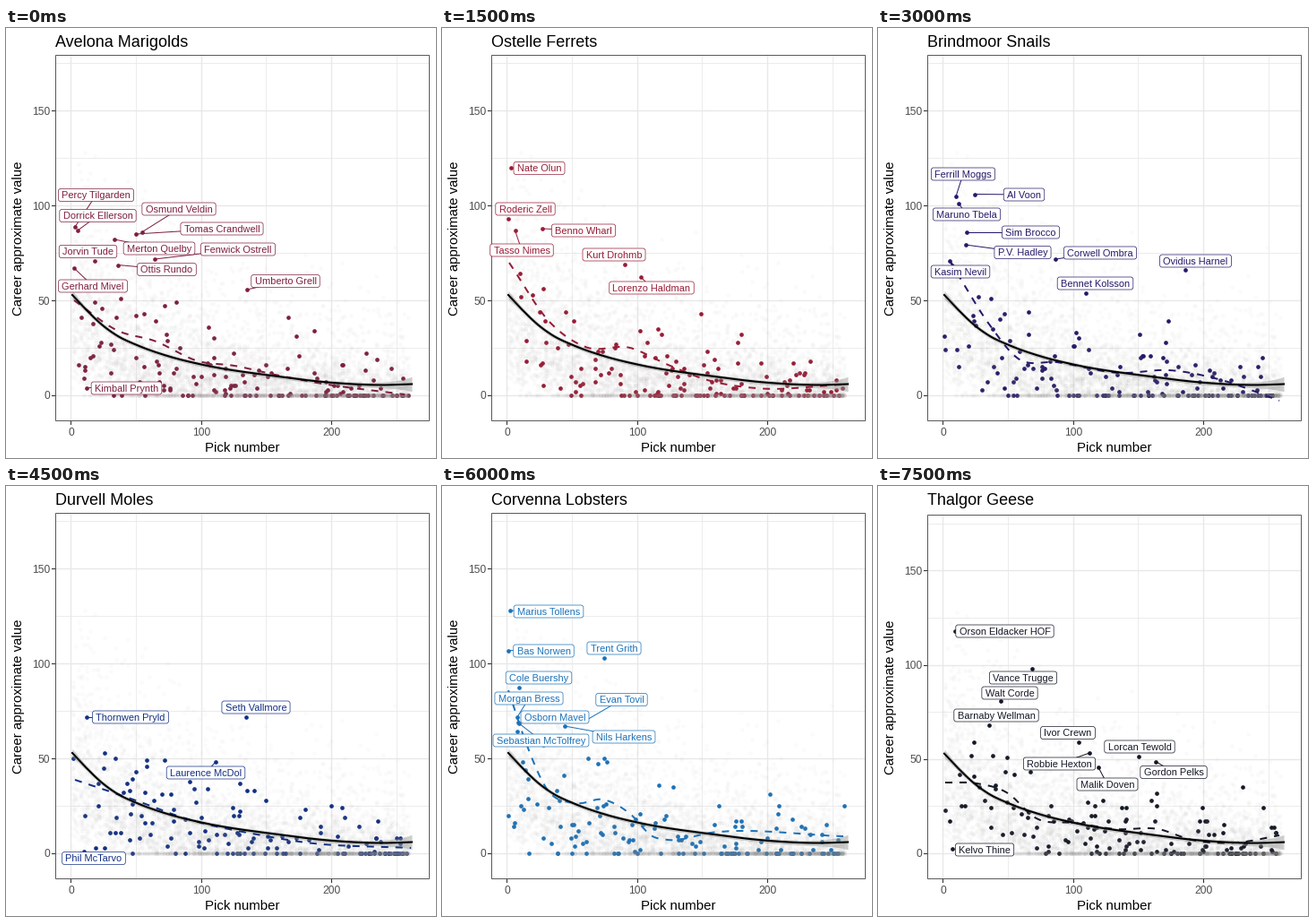
A matplotlib script that plays this animation: 480x480 px, repeating every 8000 ms.

```python
import numpy as np
import matplotlib.pyplot as plt
from matplotlib.animation import FuncAnimation
from matplotlib.patches import FancyBboxPatch, Rectangle

PX = 0.72  # points per pixel at 100 dpi
X0, XSTEP = 72.4, 1.4535
Y0, YSTEP = 410, 2.118
LEFT, RIGHT, TOP, BOTTOM = 55, 472, 30, 438

plt.rcParams["font.family"] = "Liberation Sans"
fig = plt.figure(figsize=(4.8, 4.8), dpi=100, facecolor="white")
ax = fig.add_axes([0, 0, 1, 1])
ax.set_xlim(0, 480)
ax.set_ylim(480, 0)
ax.axis("off")


def smooth(points, n=220):
    """Cubic Hermite curve through a few (x, y) points."""
    x, y = np.array(points, float).T
    slope = np.gradient(y, x)
    xs = np.linspace(x[0], x[-1], n)
    i = np.clip(np.searchsorted(x, xs) - 1, 0, len(x) - 2)
    h = x[i + 1] - x[i]
    t = (xs - x[i]) / h
    ys = ((2 * t**3 - 3 * t**2 + 1) * y[i] + (t**3 - 2 * t**2 + t) * h * slope[i]
          + (3 * t**2 - 2 * t**3) * y[i + 1] + (t**3 - t**2) * h * slope[i + 1])
    return xs, ys


def draft(seed, n, cap):
    """Random picks whose value decays with pick number; late ones often fail."""
    rng = np.random.default_rng(seed)
    pick = rng.integers(1, 260, n)
    fail = 0.55 * (pick / 255) ** 1.1
    mean = (5 + 47 * np.exp(-pick / 62)) / (1 - fail)
    shape = 1.1 + 1.4 * np.exp(-pick / 50)
    value = np.round(rng.gamma(shape, mean / shape))
    value[rng.random(n) < fail] = 0
    keep = value < cap * (0.55 + 0.45 * np.exp(-pick / 90))
    return pick[keep], value[keep]


LEAGUE = draft(12, 5200, 138)
TREND = smooth([(74, 298), (90, 315), (108, 332), (125, 344), (145, 353.5),
                (180, 366), (220, 376), (300, 388.5), (365, 396), (420, 398.5),
                (453, 397.5)])
scenes = []


class Scene:
    def __init__(self, title, color, tint, squeeze=1.0):
        self.color, self.tint, self.k = color, tint, squeeze
        self.items = []
        self.axes_frame()
        self.text(55, 21, title, 18)
        scenes.append(self)
        self.dots(draft(len(scenes), 150, 68), color, 2)
        self.dots(LEAGUE, tint, 3, alpha=0.036)

    def fit(self, y):
        return Y0 + (np.asarray(y) - Y0) * self.k

    def value_y(self, v):
        return self.fit(Y0 - YSTEP * np.asarray(v))

    def line(self, x, y, color, width, z, **kw):
        self.items += ax.plot(x, y, color=color, lw=width * PX, zorder=z, **kw)

    def text(self, x, y, s, size, color="black", ha="left", z=9, **kw):
        t = ax.text(x, y, s, fontsize=size * PX, color=color, ha=ha,
                    va="baseline", zorder=z, **kw)
        self.items.append(t)
        return t

    def markers(self, x, y, color, z, **kw):
        self.items += ax.plot(x, y, "o", ms=4.7 * PX, mew=0, color=color,
                              zorder=z, **kw)

    def dots(self, players, color, z, **kw):
        pick, value = players
        self.markers(X0 + XSTEP * pick, self.value_y(value), color, z, **kw)

    def axes_frame(self):
        top = self.fit(TOP)
        for v in range(0, 176, 25):
            y = self.value_y(v)
            major = v % 50 == 0
            self.line([LEFT, RIGHT], [y, y], "#e8e8e8", 1.4 if major else 0.8, 1)
            if major:
                self.line([LEFT - 4, LEFT], [y, y], "#333333", 1.1, 1)
                self.text(49, y + 4.5, str(v), 12, "#4d4d4d", "right")
        for p in range(0, 251, 50):
            x = X0 + XSTEP * p
            major = p % 100 == 0
            self.line([x, x], [top, BOTTOM], "#e8e8e8", 1.4 if major else 0.8, 1)
            if major:
                self.line([x, x], [BOTTOM, BOTTOM + 4], "#333333", 1.1, 1)
                self.text(x, 455, str(p), 12, "#4d4d4d", "center")
        box = Rectangle((LEFT, top), RIGHT - LEFT, BOTTOM - top, fill=False,
                        ec="#5a5a5a", lw=1 * PX, zorder=6)
        self.items.append(ax.add_patch(box))
        self.text(263.7, 473, "Pick number", 15, ha="center")
        self.text(18, (top + BOTTOM) / 2 + 0.5, "Career approximate value", 15,
                  ha="center", rotation=90, rotation_mode="anchor")

    def curves(self, *points):
        x, y = TREND[0], self.fit(TREND[1])
        half = 2.3 + 2.5 * np.exp((74 - x) / 12) + 6 * np.exp((x - 453) / 18)
        self.items.append(ax.fill_between(x, y - half, y + half, lw=0,
                                          color="#8f938f", alpha=0.45, zorder=4))
        self.line(*smooth(points), self.color, 2, 4.5, dashes=(4, 4),
                  dash_capstyle="butt")
        self.line(x, y, "black", 2.1, 5)

    def label(self, name, px, py, cx, cy):
        """Mark a player at (px, py) with a name box centred on (cx, cy)."""
        z = 7 + len(self.items) * 0.01
        t = self.text(cx, cy + 3.9, name, 11, self.color, "center", z + 0.005)
        w, h = t.get_window_extent().width + 7.5, 14
        gap = np.hypot(max(abs(px - cx) - w / 2, 0), max(abs(py - cy) - h / 2, 0))
        if gap > 4.5:
            self.line([px, cx], [py, cy], self.color, 1, 6.5)
        box = FancyBboxPatch((cx - w / 2, cy - h / 2), w, h, fc="white",
                             ec=self.color, lw=0.7 * PX, zorder=z,
                             boxstyle="round,pad=0,rounding_size=2.6")
        self.items.append(ax.add_patch(box))
        self.markers([px], [py], self.color, 2)


s = Scene("Avelona Marigolds", "#7d1f3d", "#988a8e")
s.label("Percy Tilgarden", 77, 222, 100.5, 186.5)
s.label("Dorrick Ellerson", 80, 226, 102.5, 209.5)
s.label("Osmund Veldin", 151.5, 228, 193, 202)
s.label("Tomas Crandwell", 145, 230, 241, 224)
s.label("Merton Quelby", 121, 236, 171, 246)
s.label("Fenwick Ostrell", 166, 258, 259, 247)
s.label("Jorvin Tude", 99, 260, 91.5, 249.5)
s.label("Ottis Rundo", 125, 264.5, 179.5, 269.5)
s.label("Umberto Grell", 269, 292, 312, 282.5)
s.label("Gerhard Mivel", 76, 268, 97, 288)
s.label("Kimball Prynth", 90, 401.5, 134.5, 402)
s.curves((76, 304), (125, 338), (165, 349), (215, 372), (255, 377), (300, 387),
         (350, 396.5), (445, 409))

s = Scene("Ostelle Ferrets", "#971c35", "#968a8d")
s.label("Nate Olun", 77, 156, 108.5, 156.5)
s.label("Roderic Zell", 74, 213, 93, 202)
s.label("Benno Wharl", 112, 224, 158, 226)
s.label("Tasso Nimes", 81.5, 226, 89, 248)
s.label("Kurt Drohmb", 203.5, 264, 192, 253)
s.label("Lorenzo Haldman", 222, 278, 234, 290)
s.curves((75, 262), (120, 328), (160, 356), (210, 357), (250, 375), (300, 394),
         (350, 402), (448, 398))

s = Scene("Brindmoor Snails", "#241a68", "#8e908a")
s.label("Ferrill Moggs", 87, 188, 95, 163)
s.label("Al Voon", 108, 185.5, 163, 186)
s.label("Maruno Tbela", 90, 196, 99, 208)
s.label("Sim Brocco", 99, 228, 170.5, 228)
s.label("P.V. Hadley", 97.5, 242, 161.5, 250.5)
s.label("Corwell Ombra", 198, 258, 248, 251)
s.label("Ovidius Harnel", 343, 270, 354.5, 260)
s.label("Bennet Kolsson", 231.5, 296, 242.5, 285)
s.label("Kasim Nevil", 80, 260, 92, 272)
s.curves((80, 260), (125, 332), (155, 368), (200, 373), (270, 385), (325, 382),
         (380, 392), (448, 416))

s = Scene("Durvell Moles", "#122f83", "#8f8f8f")
s.label("Thornwen Pryld", 90, 258, 139, 258)
s.label("Seth Vallmore", 267.5, 258, 279, 247)
s.label("Laurence McDol", 234, 308, 223, 320)
s.label("Phil McTarvo", 110, 404, 98, 415.5)
s.curves((77, 328), (145, 351), (200, 371), (280, 389), (335, 398), (452, 404))

s = Scene("Corvenna Lobsters", "#1c72b8", "#8f9092")
s.label("Marius Tollens", 75.5, 139, 119, 140)
s.label("Bas Norwen", 74, 183.5, 113.5, 184)
s.label("Trent Grith", 180.5, 192, 192, 181)
s.label("Cole Buershy", 86, 225, 108, 214)
s.label("Osborn Mavel", 85, 264, 126, 258)
s.label("Morgan Bress", 84, 258, 97, 237)
s.label("Evan Tovil", 160, 262, 200.5, 238.5)
s.label("Nils Harkens", 137, 268, 203, 280)
s.label("Sebastian McTolfrey", 86, 265, 110.5, 284)
s.curves((74, 228), (95, 290), (115, 335), (150, 354), (180, 350), (210, 366),
         (235, 391), (252, 395), (300, 387), (448, 391))

s = Scene("Thalgor Geese", "#141826", "#8c8c8c", squeeze=0.9938)
s.label("Orson Eldacker HOF", 86, 162, 141.5, 162)
s.label("Vance Trugge", 171.5, 204, 162, 214)
s.label("Walt Corde", 137, 240, 147, 231)
s.label("Barnaby Wellman", 124, 267, 132, 256)
s.label("Ivor Crewn", 224, 286, 212, 275.5)
s.label("Robbie Hexton", 236, 298, 202.5, 310)
s.label("Lorcan Tewold", 291, 302, 292, 291)
s.label("Malik Doven", 246, 314, 256, 333)
s.label("Gordon Pelks", 310, 307.5, 330, 319.5)
s.label("Kelvo Thine", 83, 405, 119, 406)
s.curves((75, 331), (110, 332), (145, 343), (175, 370), (220, 376), (265, 383),
         (313, 383), (350, 395), (400, 398), (448, 390))


def show(i):
    """Each scene holds for three ticks of half a second."""
    for n, scene in enumerate(scenes):
        for item in scene.items:
            item.set_visible(n == i // 3)
    return []


anim = FuncAnimation(fig, show, frames=16, interval=500, init_func=lambda: show(0),
                     repeat=True, repeat_delay=0, blit=False)
plt.show()
```
